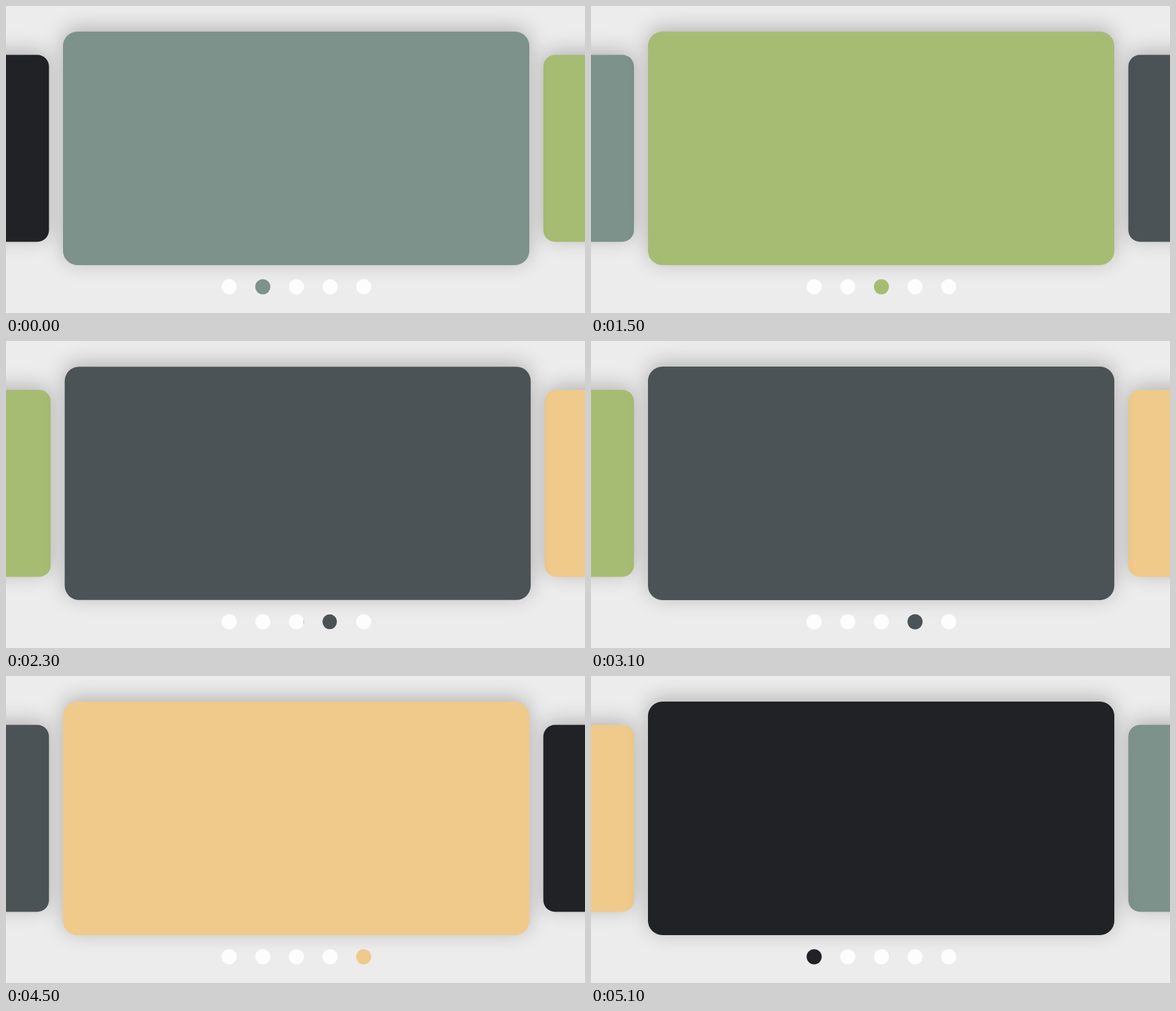
Animation, 884 px wide and 468 px high, one loop 5200 ms. Source, as an HTML page with a canvas:

```html
<!DOCTYPE html>
<html lang="en">
<head>
<meta charset="utf-8">
<title>Card carousel</title>
<style>
  html, body { margin: 0; width: 100%; height: 100%; overflow: hidden; background: #ececec; }
  canvas { display: block; }
</style>
</head>
<body>
<canvas id="stage" width="884" height="468"></canvas>
<script>
const ctx = document.getElementById('stage').getContext('2d');
const COLORS = ['#212226', '#7c928b', '#a7bc73', '#4c5356', '#efca8a'];
const LOOP = 5200, TICK = 100;
const FIRST_SLIDE = 766, INTERVAL = 1258, SLIDES = 4;
const CARD_MS = 300, DOT_MS = 375;
const BIG = 712, SMALL = BIG * 0.8, GAP = 21.4;
const LEFT = 87, MID_Y = 217, RADIUS = 22;
const DOT = { x: 340.7, y: 428, step: 51.35, r: 11.5 };

const color = i => COLORS[(i + COLORS.length) % COLORS.length];

// cubic-bezier(.25, .1, .25, 1)
function ease(x) {
  if (x <= 0) return 0;
  if (x >= 1) return 1;
  let lo = 0, hi = 1, s;
  for (let i = 0; i < 24; i++) {
    s = (lo + hi) / 2;
    if (0.75 * s * (1 - s) + s ** 3 < x) lo = s; else hi = s;
  }
  return 0.3 * s * (1 - s) ** 2 + 3 * s * s * (1 - s) + s ** 3;
}

function drawCard(card) {
  const { x, w, fill } = card, h = w / 2;
  ctx.save();
  ctx.shadowColor = 'rgba(0, 0, 0, 0.25)';
  ctx.shadowBlur = 31;
  ctx.shadowOffsetY = -5;
  ctx.fillStyle = fill;
  ctx.beginPath();
  ctx.roundRect(x, MID_Y - h / 2, w, h, RADIUS * w / BIG);
  ctx.fill();
  ctx.restore();
}

function drawCards(current, p) {
  const shrink = (BIG - SMALL) * p;
  const widths = [SMALL, BIG - shrink, SMALL + shrink, SMALL];
  let x = LEFT - (SMALL + GAP) * (p + 1);
  const cards = widths.map((w, i) => {
    const card = { x, w, fill: color(current + i - 1) };
    x += w + GAP;
    return card;
  });
  // the largest card lies on top
  cards.sort((a, b) => a.w - b.w).forEach(drawCard);
}

function disc(x, fill) {
  ctx.fillStyle = fill;
  ctx.beginPath();
  ctx.arc(x, DOT.y, DOT.r, 0, Math.PI * 2);
  ctx.fill();
}

function fillDot(index, shift) {
  const i = index % COLORS.length, x = DOT.x + i * DOT.step;
  ctx.save();
  ctx.beginPath();
  ctx.arc(x, DOT.y, DOT.r, 0, Math.PI * 2);
  ctx.clip();
  disc(x + shift * 2 * DOT.r, color(i));
  ctx.restore();
}

function drawDots(current, p) {
  COLORS.forEach((c, i) => {
    const moving = i === current % 5 && p < 1 || i === (current + 1) % 5 && p > 0;
    const still = p === 0 && i === current % 5 || p === 1 && i === (current + 1) % 5;
    const x = DOT.x + i * DOT.step;
    if (still) return disc(x, c);
    disc(x, '#fdfdfd');
    if (moving) fillDot(i, i === current % 5 ? p : p - 1);
  });
}

function draw(t) {
  const n = Math.floor((t - FIRST_SLIDE) / INTERVAL);
  const slide = Math.max(0, Math.min(SLIDES - 1, n));
  const elapsed = t - FIRST_SLIDE - slide * INTERVAL;
  const current = slide + 1;
  ctx.fillStyle = '#ececec';
  ctx.fillRect(0, 0, 884, 468);
  drawCards(current, ease(elapsed / CARD_MS));
  drawDots(current, ease(elapsed / DOT_MS));
}

const start = performance.now();
function loop() {
  const t = (performance.now() - start) % LOOP;
  draw(Math.floor(t / TICK) * TICK);
  requestAnimationFrame(loop);
}
loop();
</script>
</body>
</html>
```
